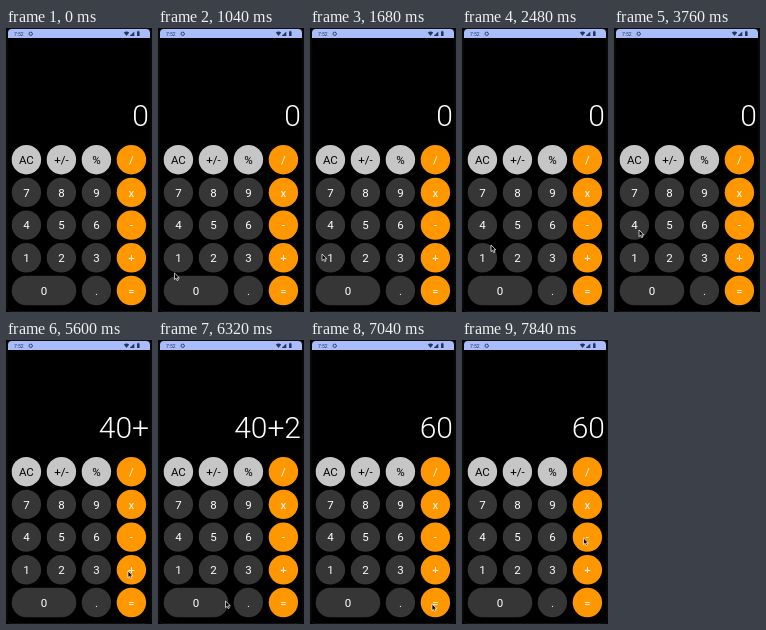
An HTML page for the animation above (8 s loop, 146 px wide and 284 px high).

```html
<!DOCTYPE html>
<html lang="en">
<head>
<meta charset="utf-8">
<title>Calculator</title>
<style>
  html, body { margin: 0; width: 100%; height: 100%; overflow: hidden; background: #000; }
  svg { display: block; width: 100vw; height: 100vh; }
  text { font-family: Roboto, Arial, sans-serif; }
  .key { font-size: 11.5px; text-anchor: middle; }
  #display { font-size: 30px; font-weight: 300; fill: #fff; text-anchor: end; }
  .clock { font-size: 5px; fill: #28345c; }
</style>
</head>
<body>
<svg id="stage" viewBox="0 0 146 284">
  <rect width="146" height="284"/>
  <rect x="1" y=".5" width="144" height="283" rx="5" fill="none" stroke="#1c1c1c" stroke-width=".6"/>
  <path d="M2 10V5a4 4 0 0 1 4-4H140a4 4 0 0 1 4 4V10Z" fill="#a9bdfb"/>
  <text class="clock" x="8" y="7.6">7:52</text>
  <circle cx="24.7" cy="5.8" r="1.7" fill="none" stroke="#28345c" stroke-width=".9"/>
  <g fill="#28345c">
    <path d="M117.8 4.4Q120.5 2.6 123.2 4.4L120.5 8Z"/>
    <path d="M128.3 3.4V8H123.7Z"/>
    <rect x="131" y="3.4" width="2.6" height="4.6" rx=".5"/>
    <rect x="131.7" y="2.8" width="1.2" height="1"/>
  </g>
  <text id="display" x="143" y="98">0</text>
  <g id="keys"></g>
  <path id="cursor" d="M0 0V6.6L1.6 5.2L2.7 7.6L3.9 7L2.8 4.8H4.9Z"
        fill="#000" stroke="#fff" stroke-width=".7" stroke-linejoin="round"/>
</svg>
<script>
const LOOP = 8000, STEP = 80;
const NS = "http://www.w3.org/2000/svg";
const display = document.getElementById("display");
const cursor = document.getElementById("cursor");
const keys = document.getElementById("keys");

function add(tag, attrs, label = "") {
  const el = document.createElementNS(NS, tag);
  for (const name in attrs) el.setAttribute(name, attrs[name]);
  el.textContent = label;
  keys.append(el);
}

function addKey(label, x, y, fill, color, width = 29.4) {
  add("rect", { x: x - width / 2, y: y - 14.7, width, height: 29.4, rx: 14.7, fill });
  add("text", { x, y: y + 4.2, fill: color, class: "key" }, label);
}

const rows = [["AC", "+/-", "%", "/"], ["7", "8", "9", "x"],
              ["4", "5", "6", "-"], ["1", "2", "3", "+"]];
rows.forEach((row, r) => row.forEach((label, c) => {
  const fill = c === 3 ? "#ff9800" : r === 0 ? "#c6c6c6" : "#363636";
  addKey(label, 20.4 + c * 35, 131.7 + r * 32.7, fill, r === 0 && c < 3 ? "#000" : "#fff");
}));
addKey("0", 38, 262.5, "#363636", "#fff", 64.6);
addKey(".", 90.4, 262.5, "#363636", "#fff");
addKey("=", 125.4, 262.5, "#ff9800", "#fff");

// time, x, y of the pointer tip
const path = [
  [0, 20, 290], [80, 20, 270], [320, 23, 251], [480, 23, 251], [560, 22, 250],
  [800, 22, 250], [880, 20, 250], [1040, 16.5, 245], [1680, 12, 226], [1840, 12, 226],
  [2320, 26, 221], [2400, 26, 221], [2480, 29, 217], [2640, 28, 222], [2720, 28, 222],
  [3040, 28, 212], [3200, 28, 212], [3760, 25, 202], [3920, 25, 202], [4400, 49, 246],
  [4640, 49, 246], [5040, 110, 252], [5520, 123, 231], [5600, 122, 231],
  [5840, 58, 231], [5920, 58, 231], [6160, 67, 261], [6480, 68, 261],
  [7040, 122, 264], [7200, 122, 264], [7520, 125, 182], [7840, 121.5, 198], [8000, 121.5, 198]
];
const entries = [[0, "0"], [3920, "4"], [4720, "40"], [5600, "40+"],
                 [6000, "40+2"], [6480, "40+20"], [7040, "60"]];

function pointerAt(t) {
  const i = path.findIndex(p => p[0] > t);
  const [t0, x0, y0] = path[i - 1], [t1, x1, y1] = path[i];
  const k = (t - t0) / (t1 - t0);
  return [x0 + (x1 - x0) * k, y0 + (y1 - y0) * k];
}

function draw(now) {
  const t = Math.floor((now % LOOP) / STEP) * STEP;
  const [x, y] = pointerAt(t);
  cursor.setAttribute("transform", `translate(${x} ${y})`);
  const value = entries.filter(e => e[0] <= t).pop()[1];
  if (display.textContent !== value) display.textContent = value;
}

const start = performance.now();
function tick() {
  draw(performance.now() - start);
  requestAnimationFrame(tick);
}
tick();
</script>
</body>
</html>
```
